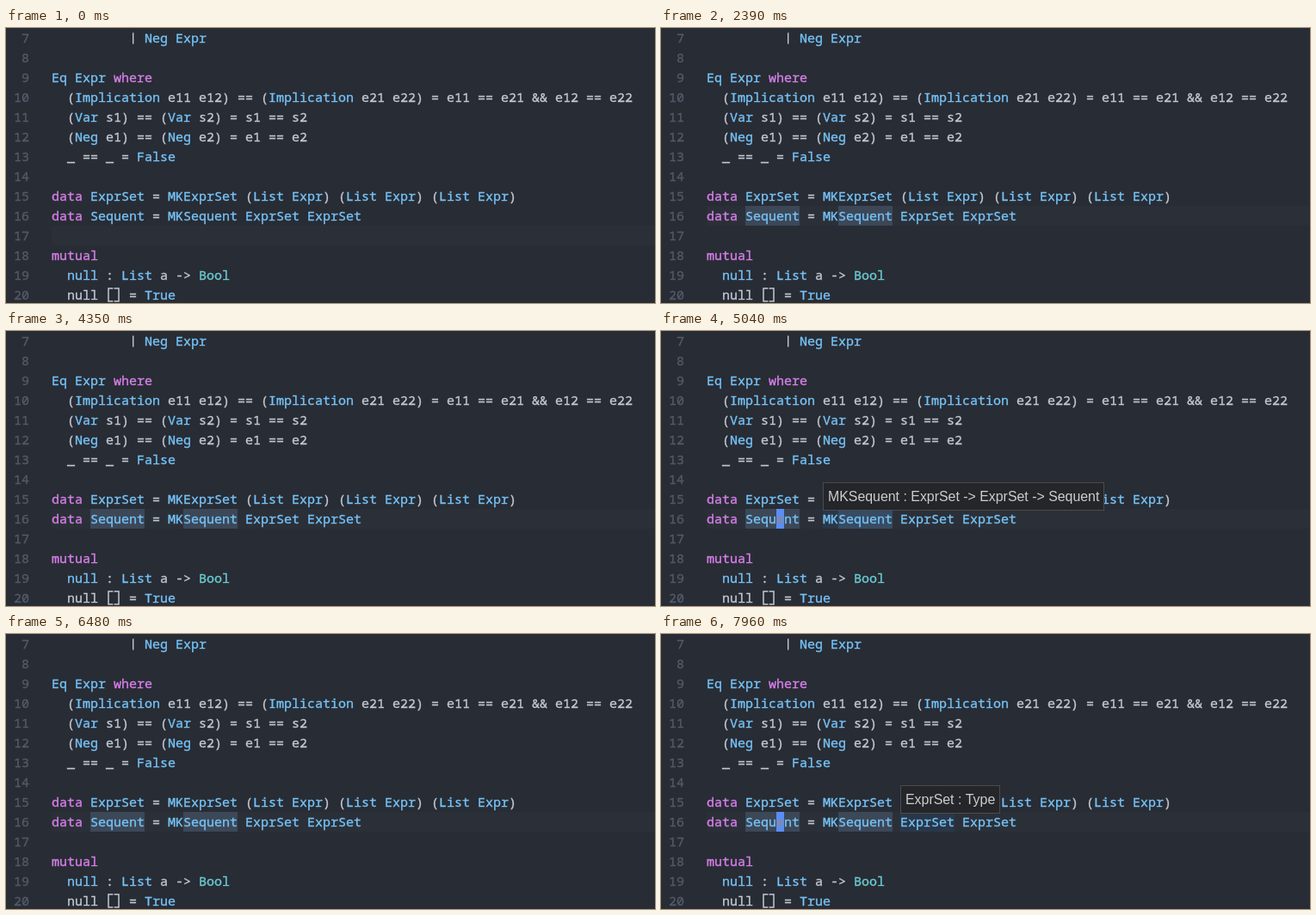
An HTML page with a canvas for the animation above (8000 ms loop, 754 px wide and 320 px high).

```html
<!DOCTYPE html>
<html lang="en">
<head>
<meta charset="utf-8">
<title>Type hints in a code editor</title>
<style>
  html, body { margin: 0; width: 100%; height: 100%; overflow: hidden; background: #282c34; }
  canvas { display: block; }
</style>
</head>
<body>
<canvas id="stage" width="754" height="320"></canvas>
<script>
const ctx = document.getElementById("stage").getContext("2d", { alpha: false });

const LOOP = 8000;
const LEFT = 53, COL = 9, ROW = 23, FIRST = 7, BASE = 16.5;
const CODE_FONT = '15px "Noto Sans Mono", "DejaVu Sans Mono", monospace';
const HINT_FONT = '15.9px "Liberation Sans", Arial, sans-serif';

const color = {
  back: "#282c34", line: "#2b3038", number: "#535a68",
  text: "#c2c9d4", type: "#76c3f8", keyword: "#d67fea", builtin: "#6accd4",
  match: "#3c4858", hover: "rgba(38, 90, 145, 0.18)",
  cursor: "#5a8df6", covered: "#8f8a8c",
  hintBack: "#252629", hintEdge: "#4a4b4e", hintText: "#cccdd0"
};

const lines = [
  "          | Neg Expr",
  "",
  "Eq Expr where",
  "  (Implication e11 e12) == (Implication e21 e22) = e11 == e21 && e12 == e22",
  "  (Var s1) == (Var s2) = s1 == s2",
  "  (Neg e1) == (Neg e2) = e1 == e2",
  "  _ == _ = False",
  "",
  "data ExprSet = MKExprSet (List Expr) (List Expr) (List Expr)",
  "data Sequent = MKSequent ExprSet ExprSet",
  "",
  "mutual",
  "  null : List a -> Bool",
  "  null [] = True"
];

const CLICK = 1700;        // the cursor moves from line 17 to line 16
const MATCH_DELAY = 250;
const hints = [
  { from: 2850, to: 4200, col: 5, size: 7, text: "Sequent : Type" },
  { from: 4600, to: 6000, col: 15, size: 9, text: "MKSequent : ExprSet -> ExprSet -> Sequent" },
  { from: 7200, to: LOOP, col: 25, size: 7, text: "ExprSet : Type" }
];

const colX = col => LEFT + col * COL;
const rowY = number => (number - FIRST) * ROW;

function cells(number, col, size, fill) {
  ctx.fillStyle = fill;
  ctx.fillRect(colX(col), rowY(number), size * COL, ROW);
}

function write(text, x, y, fill) {
  ctx.fillStyle = fill;
  ctx.fillText(text, x, y);
}

// code is a little heavier than the regular weight
function writeCode(text, x, y, fill) {
  write(text, x, y, fill);
  ctx.strokeStyle = fill;
  ctx.lineWidth = 0.35;
  ctx.strokeText(text, x, y);
}

// signs whose shape differs from the font's
const signs = {
  "|"(x, y) {
    ctx.fillStyle = color.text;
    ctx.fillRect(x + 4, y - 11, 1.4, 13);
  },
  "[]"(x, y) {
    ctx.strokeStyle = color.text;
    ctx.lineWidth = 1.5;
    for (const [edge, tip] of [[3, 8.4], [15, 9.6]]) {
      ctx.beginPath();
      ctx.moveTo(x + tip, y - 12.5);
      ctx.lineTo(x + edge, y - 12.5);
      ctx.lineTo(x + edge, y + 2.5);
      ctx.lineTo(x + tip, y + 2.5);
      ctx.stroke();
    }
  }
};

function drawCode() {
  const token = /(data|where|mutual)|(Bool)|([A-Z]\w*|null(?= :))|[^\sA-Z]+/g;
  ctx.font = CODE_FONT;
  ctx.textBaseline = "alphabetic";
  lines.forEach((line, i) => {
    const number = FIRST + i;
    const y = rowY(number) + BASE;
    ctx.textAlign = "right";
    writeCode(number, 27, y, color.number);
    ctx.textAlign = "left";
    for (const part of line.matchAll(token)) {
      const [text, keyword, builtin, type] = part;
      const x = colX(part.index);
      const kind = keyword ? "keyword" : builtin ? "builtin" : type ? "type" : "text";
      if (signs[text]) signs[text](x, y);
      else writeCode(text, x, y, color[kind]);
    }
  });
}

function drawCursor(t) {
  const clicked = t >= CLICK;
  const phase = (t - (clicked ? CLICK : 100) + 1000) % 1000;
  if (phase >= 500) return;
  if (clicked) {
    cells(16, 9, 1, color.cursor);
    writeCode("e", colX(9), rowY(16) + BASE, color.covered);
  } else {
    cells(17, 0, 1, color.cursor);
  }
}

function drawHint(hint) {
  ctx.font = HINT_FONT;
  const x = colX(hint.col), y = 176;
  const width = Math.round(ctx.measureText(hint.text).width) + 12;
  ctx.fillStyle = color.hintBack;
  ctx.fillRect(x, y, width, 33);
  ctx.strokeStyle = color.hintEdge;
  ctx.lineWidth = 1;
  ctx.strokeRect(x + 0.5, y + 0.5, width - 1, 32);
  write(hint.text, x + 6, y + 22, color.hintText);
}

function draw(t) {
  ctx.fillStyle = color.back;
  ctx.fillRect(0, 0, 754, 320);
  cells(t < CLICK ? 17 : 16, 0, 78, color.line);
  if (t >= CLICK + MATCH_DELAY) {
    cells(16, 5, 7, color.match);
    cells(16, 17, 7, color.match);
  }
  const hint = hints.find(h => t >= h.from && t < h.to);
  if (hint) cells(16, hint.col, hint.size, color.hover);
  drawCode();
  drawCursor(t);
  if (hint) drawHint(hint);
}

const start = performance.now();
function frame() {
  draw((performance.now() - start) % LOOP);
  requestAnimationFrame(frame);
}
frame();
</script>
</body>
</html>
```
